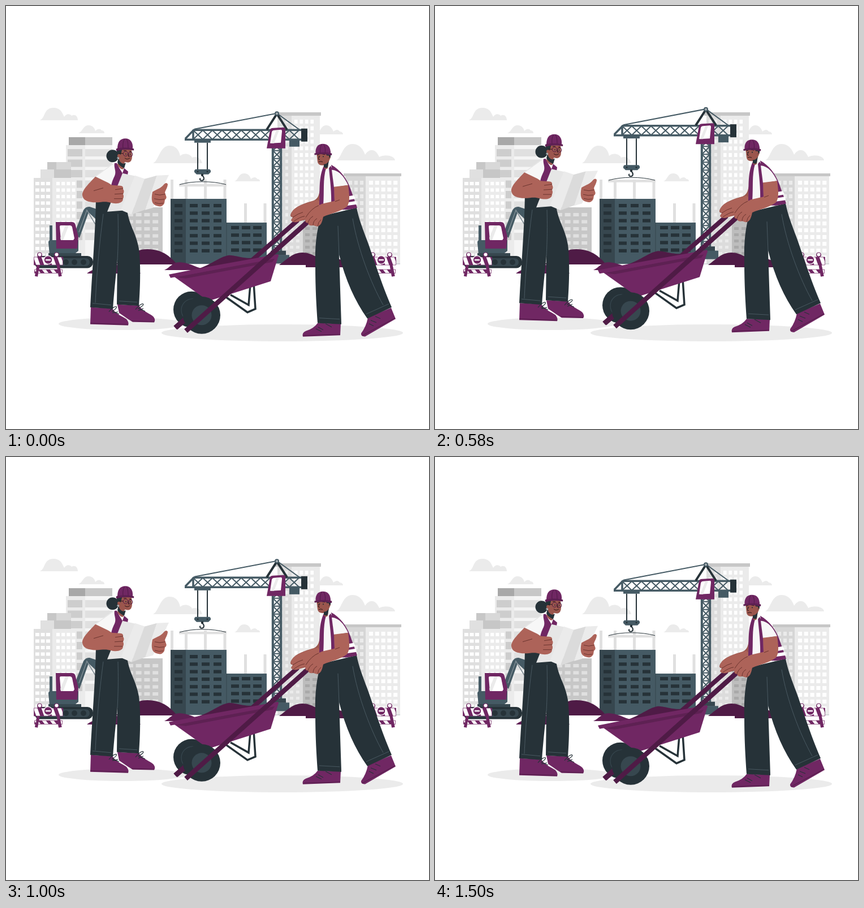
These frames come from a looping animation (748 px wide and 748 px high, 1540 ms). An HTML page with a canvas:

```html
<!DOCTYPE html>
<html lang="en">
<head>
<meta charset="utf-8">
<title>Construction site</title>
<style>
  html, body { margin: 0; width: 100%; height: 100%; overflow: hidden; background: #fff; }
  canvas { display: block; width: 748px; height: 748px; }
</style>
</head>
<body>
<canvas id="stage" width="748" height="748"></canvas>
<script>
const ctx = document.getElementById('stage').getContext('2d');
const PURPLE = '#702763', PLUM = '#4f1b46', DARK = '#263238', SLATE = '#455a64', STEEL = '#37474f';
const SKIN = '#ad6359', FACE = '#9b564d', PALE = '#ebebeb', MID = '#e0e0e0', GREY = '#c7c7c7';

const fill = (d, color) => { ctx.fillStyle = color; ctx.fill(new Path2D(d)); };
const line = (d, color, width = 1) => {
  ctx.strokeStyle = color; ctx.lineWidth = width; ctx.stroke(new Path2D(d));
};
const box = (x, y, w, h, color) => { ctx.fillStyle = color; ctx.fillRect(x, y, w, h); };
const oval = (x, y, rx, ry, color) => {
  ctx.fillStyle = color; ctx.beginPath(); ctx.ellipse(x, y, rx, ry, 0, 0, 7); ctx.fill();
};
const disc = (x, y, r, color) => oval(x, y, r, r, color);
const ring = (x, y, r, color, width) => {
  ctx.strokeStyle = color; ctx.lineWidth = width;
  ctx.beginPath(); ctx.arc(x, y, r, 0, 7); ctx.stroke();
};
const grid = (x, y, cols, rows, dx, dy, w, h, color) => {
  for (let r = 0; r < rows; r++)
    for (let c = 0; c < cols; c++) box(x + c * dx, y + r * dy, w, h, color);
};
const at = (x, y, draw) => { ctx.save(); ctx.translate(x, y); draw(); ctx.restore(); };

function clouds() {
  [
    'M60 202C70 198 66 180 84 180C97 180 100 190 103 196C106 190 113 190 116 194C123 190 127 196 127 202Z',
    'M128 225C136 222 136 211 146 211C154 211 157 217 158 221C162 216 168 217 169 220C173 220 174 223 174 225Z',
    'M260 278C270 274 272 247 289 247C302 247 307 258 308 265C314 259 326 261 329 268C340 264 346 272 347 278Z',
    'M404 310C411 308 411 296 421 296C429 296 432 302 433 306C438 301 444 303 444 306C448 306 449 308 449 310Z',
    'M553 227C556 216 560 211 566 211C574 211 577 217 579 222C584 217 589 219 590 222C594 222 596 225 596 227Z',
    'M584 273C594 269 594 244 613 244C627 244 633 257 635 263C642 252 653 251 660 267C669 262 687 264 688 273Z'
  ].forEach(d => fill(d, PALE));
}

function city() {
  // left towers
  box(111, 232, 29, 14, '#a8a8a8'); box(140, 232, 48, 14, GREY);
  box(106, 246, 34, 210, PALE); box(140, 246, 48, 210, '#f5f5f5');
  grid(109, 253, 1, 9, 0, 18.5, 26, 13, '#cdcdcd');
  grid(140, 253, 1, 9, 0, 18.5, 48, 13, MID);
  box(73, 276, 16, 28, GREY); box(89, 276, 26, 28, '#d8d8d8');
  box(61, 289, 24, 15, MID); box(85, 289, 30, 15, GREY);
  box(49, 304, 33, 152, '#dfdfdf'); box(82, 304, 43, 152, PALE);
  grid(52, 311, 3, 12, 9.5, 11.5, 7, 6, '#fff');
  grid(89, 311, 4, 12, 9.2, 11.5, 6, 6, '#fff');
  // low grey block
  box(192, 356, 85, 100, GREY);
  grid(200, 366, 5, 7, 14.8, 12.5, 10, 6, MID);
  // tall tower behind the crane
  box(476, 188, 81, 6, GREY);
  box(480, 194, 25, 262, '#dcdcdc'); box(505, 194, 50, 262, PALE);
  grid(484, 201, 2, 20, 10, 11.8, 5, 6, '#eee');
  grid(510, 201, 4, 20, 9.5, 11.8, 5.5, 7, '#fff');
  box(498, 375, 27, 81, '#dcdcdc'); box(525, 375, 30, 81, '#bdbdbd');
  grid(529, 391, 2, 5, 13, 11, 8, 5, '#a9a9a9');
  grid(502, 391, 2, 5, 11, 11, 6, 5, PALE);
  // right tower
  box(597, 296, 102, 5, GREY);
  box(600, 301, 36, 155, '#d6d6d6'); box(636, 301, 61, 155, PALE);
  grid(606, 309, 3, 12, 10, 12, 6, 7, PALE);
  grid(642, 309, 5, 12, 10.8, 12, 7, 7, '#fff');
  line('M49 456H697', '#b5bcc0', 1);
}

function unfinishedBlocks() {
  for (const x of [291, 316, 350, 384.5]) box(x, 307, 5, 35, MID);
  for (const x of [421, 455.5]) box(x, 349, 5, 35, MID);
  box(291, 341, 99, 115, SLATE); box(291, 341, 27, 115, STEEL);
  grid(298, 350, 1, 7, 0, 13.3, 14, 6, DARK);
  grid(325, 350, 3, 7, 21, 13.3, 14, 6, DARK);
  box(390, 383, 71, 73, SLATE); box(389.5, 383, 1, 73, STEEL);
  grid(398, 389, 1, 4, 0, 13.2, 14, 6, DARK);
  grid(417, 389, 2, 4, 20, 13.2, 15, 6, DARK);
}

function crane() {
  line('M333 218L479 190L519 219', SLATE, 2);
  for (let x = 331; x < 515; x += 17)
    line(`M${x} 220L${x + 17} 236M${x} 236L${x + 17} 220`, SLATE, 2);
  line('M317 235L332 219.5H522M316 236.5H522M331 219V236', SLATE, 3.5);
  line('M461 219L479 191L497 219', DARK, 4);
  disc(479, 190.5, 4, SLATE); disc(479, 190.5, 2, '#a8b0b4');
  box(501, 237, 18, 12, SLATE); box(522, 217, 11, 23, DARK);
  box(333, 237, 29, 5, SLATE);
  line('M339 242V291M356 242V291', DARK, 2);
  fill('M335 289H360L362 291V294L358 298H337L333 294V291Z', SLATE);
  disc(339, 293, 1.5, DARK); disc(356, 293, 1.5, DARK); box(345, 297, 4, 4, DARK);
  line('M347 300C352 304 350 309 346 309C343 309 342 306 344 305', DARK, 2);
  box(306, 315, 84, 4.5, MID);
  line('M307 316Q325 311 347 311Q371 311 389 316', DARK, 1);
  for (let y = 242; y < 428; y += 14)
    line(`M472 ${y}L486 ${y + 14}M486 ${y}L472 ${y + 14}M472 ${y}H486`, SLATE, 2);
  line('M471.8 237V435M486.2 237V435', SLATE, 4);
  box(468, 433, 27, 8, STEEL); box(461, 440.5, 40, 15, SLATE);
  fill('M467 219Q468 216 472 216L491 215Q494 215 494 219V252L461 252Z', PURPLE);
  fill('M470 223Q471 220 474 220L486 219Q488 219 488 222L486 242L467 243Z', '#fff');
  fill('M478 220H483L474 243H469Z', PALE);
}

function mounds() {
  fill('M190 457C220 450 220 430 250 430C278 430 292 445 303 457Z', PLUM);
  fill('M143 473C157 461 176 464 190 459C215 453 230 463 238 473Z', '#5f2054');
  fill('M280 467C291 462 294 453 307 453C325 454 333 461 346 464V467Z', '#5f2054');
  fill('M483 458C497 448 507 436 524 436C543 436 551 449 569 448C588 445 600 448 608 462H530V458Z', PLUM);
}

function excavator() {
  box(77, 388, 5, 32, SLATE);
  fill('M121 402L137 361Q141 354 148 355L160 359V378L146 365L130 410Z', SLATE);
  line('M129 400L143 361L158 386', '#7d8b92', 1.5);
  fill('M75 418Q75 414 79 414H128V433L119 440H77Z', SLATE);
  fill('M88 382H117Q122 382 123 388L128 408L126 429H89Z', PURPLE);
  fill('M95 390Q95 388 97 388H113Q116 388 117 391L121 411L119 414H97Z', '#fff');
  fill('M105 388H111L101 414H97L96 410Z', PALE);
  box(75, 437, 58, 6, STEEL);
  ctx.fillStyle = DARK; ctx.beginPath(); ctx.roundRect(50, 442, 104, 21.5, 10); ctx.fill();
  ctx.fillStyle = STEEL; ctx.beginPath(); ctx.roundRect(56, 446, 92, 14, 7); ctx.fill();
  for (const x of [64, 78, 92, 106, 121, 137]) disc(x, 453, 5, DARK);
}

function barrier() {
  for (const x of [10, 40]) {
    disc(x, 440, 4.5, PURPLE); disc(x, 439.5, 3, '#fff');
  }
  line('M10 444L4 478M40 444L46 478', PURPLE, 5);
  const plank = (y, w, h, x0) => {
    box(x0, y, w, h, '#fff');
    ctx.save(); ctx.beginPath(); ctx.rect(x0, y, w, h); ctx.clip();
    for (let x = x0 - 8; x < x0 + w + 8; x += 14)
      fill(`M${x} ${y}h7l5 ${h}h-7Z`, PURPLE);
    ctx.restore();
    line(`M${x0} ${y}h${w}v${h}h${-w}Z`, PURPLE, .7);
  };
  plank(444, 51, 14, 0);
  plank(466, 49, 6.5, 1);
  line('M8 459L4 478M43 459L47 478', PURPLE, 4.5);
  disc(25, 449, 8, '#fff'); disc(25, 449, 6.7, PURPLE); box(20.5, 447.8, 9, 2.5, '#fff');
}

function hardHat() {
  // dome sits on a 30 px wide brim, origin at its top left
  fill('M2 18C2 6 7 0 16 0C25 0 30 7 29 18Q15 21 2 18Z', PURPLE);
  fill('M0 18Q15 14 31 18Q32 22 29 21Q15 18 1 22Q-1 21 0 18Z', '#5e2053');
  line('M12 17C11 8 13 3 15 1M21 17C21 9 20 4 18 1', PLUM, 1);
}

function woman() {
  fill('M150 533L188 535C194 545 206 549 213 554Q218 560 216 565L149 563Z', PURPLE);
  fill('M197 528L235 530C241 540 255 544 261 550Q265 556 262 559.7L224 559L216 554L200 543Z', PURPLE);
  line('M149 561L216 563.5M222 557L262 558.5', PLUM, 1);
  fill('M159 342C158 405 152 470 149 533L189 536C191 506 195 472 197 448L196 528L235 530.5C238 490 238 454 235 430C230 400 218 390 214 360L196 340Z', DARK);
  line('M198 368C199 405 198 430 197 450M153 526L186 529M200 522L232 524M172 368C164 430 160 480 158 525', '#52636b', .8);
  line('M182 541C194 526 202 532 188 540L200 545M188 543L198 541M229 537C242 520 250 528 234 535L246 540M234 539L243 535', DARK, 1.2);
  // body and vest
  fill('M190 278L157 302L184 316V345H208L214 293L203 279Z', '#f7f7f7');
  line('M190 279L158 302L181 314', '#d8d8d8', .8);
  fill('M192 278C190 286 196 292 192 301C187 311 184 320 184 345H208L216 293L209 287L206 296Q200 287 196 278Z', PURPLE);
  // head
  disc(188.5, 265.5, 11, DARK);
  fill('M198 254H222L223 266Q223 276 216 277L210 276L208 288Q204 292 197 281L200 270Z', FACE);
  fill('M199 268C200 277 207 282 212 277L209 287Q200 283 197 277Z', DARK);
  fill('M197 251H206L203 263L199 269Q194 261 197 251Z', DARK);
  disc(200, 265, 3, FACE); ring(198, 269, 1.2, '#fff', .8);
  ring(211.5, 261.5, 4.2, PLUM, 1); ring(220, 262.5, 3.8, PLUM, 1);
  line('M200 261L207 261M208 256L213 256M218 257L222 258M210 269Q214 273 219 269M216 262L217 267', '#2b1717', 1);
  disc(212, 262, 1, DARK); disc(219.5, 262.5, 1, DARK);
  at(195, 234.5, hardHat);
  // map
  fill('M206 296L229 301L205 362L179 364Z', '#e6e6e6');
  fill('M228 300L246 306L222 369L203 361Z', PALE);
  fill('M245 306L267 300L247 360L222 369Z', '#dbdbdb');
  fill('M267 300L288 299L260 357L246 361Z', PALE);
  // arms
  fill('M158 302C146 315 134 326 135 335C136 346 151 349 168 347C184 345 187 351 199 349Q207 347 207 341Q209 337 207 333Q210 328 207 324Q208 318 202 318L187 317L181 313Z', SKIN);
  line('M172 322L155 327M193 325L207 323M192 333L207 332M191 341L206 341', '#6b342f', 1);
  fill('M259 329C267 324 275 322 279 316Q283 311 286 315C286 321 282 326 281 330L283 336Q285 340 281 343L280 349Q276 357 268 354C258 352 256 344 259 329Z', SKIN);
  line('M263 333Q272 336 281 333M262 341Q271 344 280 342M263 348Q271 351 278 349', '#6b342f', 1);
}

function barrow() {
  disc(328, 537, 32, DARK); ring(330, 538, 20, STEEL, 1.2);
  line('M299 569L516 379', PLUM, 8);
  line('M389 515L427 542L441 536L438 490M397 511L429 529L432 493', DARK, 3.5);
  fill('M336 466C362 459 376 444 394 441C407 441 416 447 441 446L478 441L470 455L340 474Z', PLUM);
  fill('M296 478L482 441L468 487L358 522Z', PURPLE);
  fill('M300 480L476 446L471 453L318 482Z', '#5e2153');
  fill('M288 475L343 464L481 439L482 443L476 447L291 481Z', PURPLE);
  disc(346, 547, 33, DARK); disc(346, 547, 17.5, STEEL);
  line('M318 575L540 376', PLUM, 8.5);
  line('M300 569L314 557', PLUM, 9);
}

function man() {
  // far arm
  fill('M556 322C553 335 553 339 545 344C528 349 512 354 505 365Q500 373 507 374L504 379Q507 384 515 382L545 374L566 355Z', FACE);
  fill('M551 343C530 349 511 355 506 364Q502 373 508 373L504 379Q508 384 515 382L540 372L560 352Z', SKIN);
  line('M507 374Q517 367 525 365M509 381Q520 373 528 372', '#6b342f', 1);
  // shoes and trousers
  fill('M551 561L592 562L591 582.5L525 585Q523 578 530 575Q544 571 551 561Z', PURPLE);
  fill('M640 551L681 534L689 553.5L635 584.7Q627 585 628 579Q637 567 640 551Z', PURPLE);
  line('M525 583L591 581M630 583L688 552', PLUM, 1);
  fill('M557 372C549 398 546 425 547 460C547 500 549 532 551 561L593 563L589 440Q606 507 639 553L682 533C663 489 650 446 639 416C630 392 624 377 620 357Z', DARK);
  line('M587 389L589 442M554 552L590 554M637 545L677 527M613 376C622 430 645 490 667 529', '#52636b', .8);
  line('M552 568L561 573M548 571L558 576M565 562L576 568M645 556L655 560M642 562L650 566M653 549L662 553', DARK, 1.2);
  // torso
  fill('M561 284L557 300C555 322 555 338 554 352L580 354L616 354L607 322C599 302 588 288 575 281Z', '#f7f7f7');
  fill('M562 283L566 287C560 307 563 328 561 353H554C555 323 553 302 562 283Z', PURPLE);
  fill('M574 283L580 294L581 346L575 353C576 330 573 308 571 287Z', PURPLE);
  fill('M575 281C591 290 602 304 609 323L621 357Q600 363 581 359L580 310Z', PURPLE);
  fill('M603 337L615 335L618 341L602 344ZM601 348L619 345L620 351L599 354Z', '#fff');
  fill('M576 290C590 291 598 303 605 317L580 321Z', '#f7f7f7');
  // head
  fill('M549 259L573 258L574 268L570 277L569 287Q565 291 562 286L562 282Q552 283 551 276Z', FACE);
  fill('M562 280Q568 280 571 274L569 285Q566 288 562 285Z', DARK);
  fill('M566 257H574V267L570 270L566 262Z', DARK); disc(569, 267, 2.6, FACE);
  line('M550 264L554 263M559 262L564 263M555 265L552 271L555 272M553 276Q557 274 560 276', '#2b1717', 1);
  disc(553, 267, 1, DARK); disc(561, 266.5, 1.1, DARK);
  at(576, 244, () => { ctx.scale(-.98, .93); hardHat(); });
  // near arm
  fill('M580 320L605 317C607 332 609 346 603 355C592 364 574 367 561 373C559 382 557 390 549 390L543 388Q536 390 534 384Q527 384 530 374C537 363 549 354 559 350L581 345Z', SKIN);
  line('M534 384Q536 376 543 372M543 388Q543 380 550 376M551 390Q552 382 557 378M530 374Q540 358 553 353M582 346L590 343', '#6b342f', 1);
}

function draw(lift) {
  const floating = shape => at(0, -lift, shape);
  box(0, 0, 748, 748, '#fff');
  clouds();
  city();
  unfinishedBlocks();
  floating(crane);
  mounds();
  excavator();
  at(49.5, 0, barrier);
  at(638.5, 0, barrier);
  oval(206, 562, 113, 11, PALE);
  oval(488.5, 578, 213.5, 15, PALE);
  floating(woman);
  floating(barrow);
  floating(man);
}

// Steady rise and fall, stepped at 24 pictures a second.
const LOOP = 1540, RATE = 24, CYCLE = 36, HEIGHT = 9.7;
const start = performance.now();
function tick() {
  const time = (performance.now() - start) % LOOP;
  const step = Math.floor((time + 5) * RATE / 1000);
  const phase = (step + .5) % CYCLE / CYCLE;
  draw(HEIGHT * (1 - Math.abs(1 - 2 * phase)));
  requestAnimationFrame(tick);
}
tick();
</script>
</body>
</html>
```
